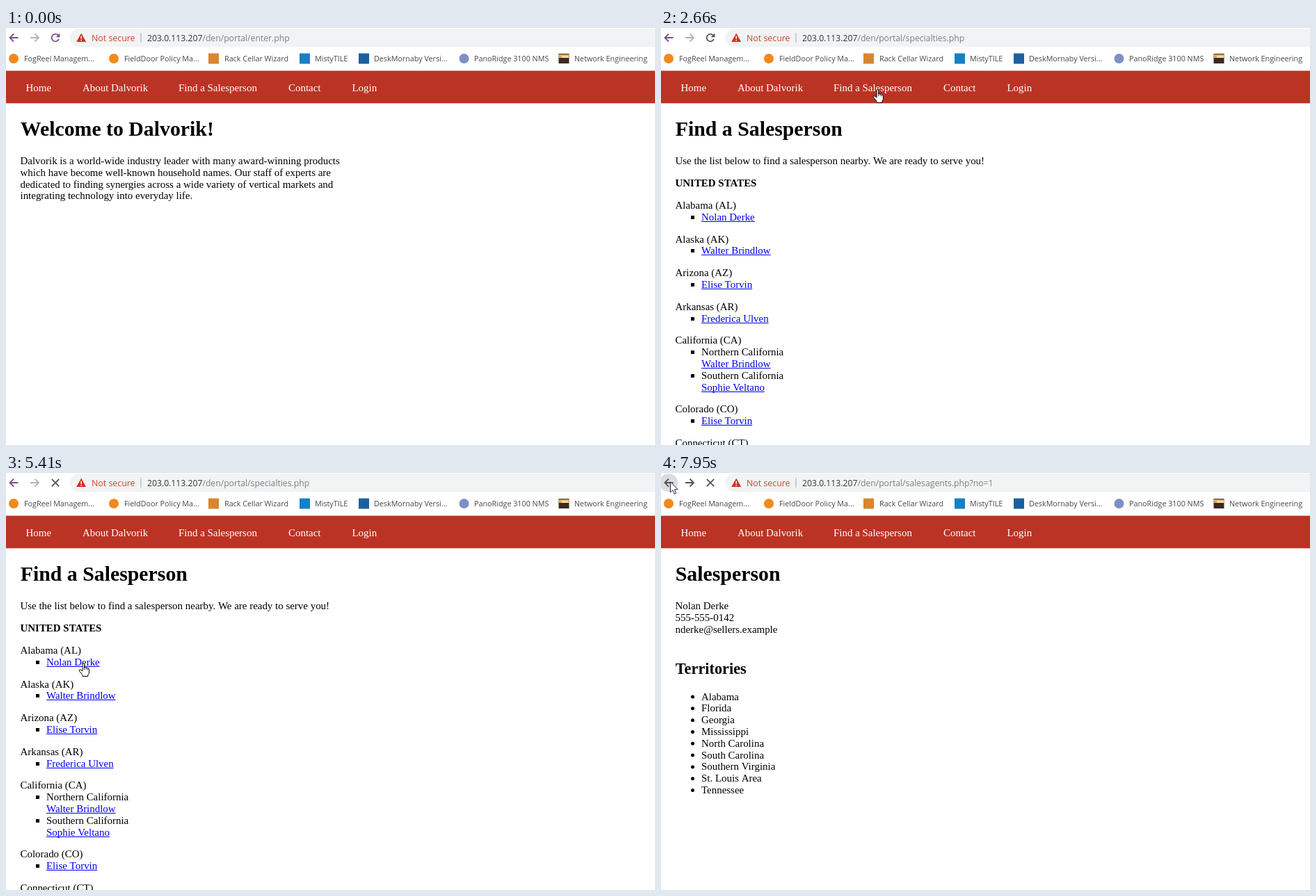
Recreate the animation shown at these times as an HTML page with a canvas. Size 933 by 600 pixels, loop 8 s.

```html
<!DOCTYPE html>
<html lang="en">
<head>
<meta charset="utf-8">
<title>Find a Salesperson</title>
<style>
  html, body { margin: 0; width: 100%; height: 100%; overflow: hidden; background: #fff; }
  canvas { display: block; }
</style>
</head>
<body>
<canvas id="stage" width="933" height="600"></canvas>
<script>
const ctx = document.getElementById('stage').getContext('2d');
const LOOP = 8000;
const SERIF = '"Liberation Serif", "Times New Roman", serif';
const SANS = '"Open Sans", "Noto Sans", sans-serif';
const BODY = `14.95px ${SERIF}`;
const LINE = 16.82;
const GAP = 14.95;
const LINK = '#0000ee';
const DARK = '#50555a';
const PURPLE = '#75548a';

const BOOKMARKS = [
  [26, 'FogReel Managem...', 'circle', 11, '#f08a1d'],
  [170, 'FieldDoor Policy Ma...', 'circle', 155, '#f08a1d'],
  [314, 'Rack Cellar Wizard', 'square', 298.5, '#d9862e'],
  [444, 'MistyTILE', 'square', 429.5, '#1680c4'],
  [529, 'DeskMornaby Versi...', 'square', 514.5, '#1c5f9e'],
  [673, 'PanoRidge 3100 NMS', 'circle', 658.5, '#7f8fc4'],
  [817, 'Network Engineering', 'photo', 802, '']
];
const NAV = [[28.5, 'Home'], [110, 'About Dalvorik'], [248, 'Find a Salesperson'],
             [406, 'Contact'], [497.5, 'Login']];
const INTRO = [
  'Dalvorik is a world-wide industry leader with many award-winning products',
  'which have become well-known household names. Our staff of experts are',
  'dedicated to finding synergies across a wide variety of vertical markets and',
  'integrating technology into everyday life.'
];
// "-" starts a bulleted line, "@" marks a link
const STATES = [
  ['Alabama (AL)', '-@Nolan Derke'],
  ['Alaska (AK)', '-@Walter Brindlow'],
  ['Arizona (AZ)', '-@Elise Torvin'],
  ['Arkansas (AR)', '-@Frederica Ulven'],
  ['California (CA)', '-Northern California', '@Walter Brindlow', '-Southern California', '@Sophie Veltano'],
  ['Colorado (CO)', '-@Elise Torvin'],
  ['Connecticut (CT)']
];
const TERRITORIES = ['Alabama', 'Florida', 'Georgia', 'Mississippi', 'North Carolina',
  'South Carolina', 'Southern Virginia', 'St. Louis Area', 'Tennessee'];

const between = (t, a, b) => t >= a && t < b;
const mix = (a, b, k) => a + (b - a) * k;
const smooth = k => k * k * (3 - 2 * k);

function text(s, x, y, font, color = '#000') {
  ctx.font = font;
  ctx.fillStyle = color;
  ctx.fillText(s, x, y);
  return ctx.measureText(s).width;
}

function rect(x, y, w, h, color) {
  ctx.fillStyle = color;
  ctx.fillRect(x, y, w, h);
}

function disc(x, y, r, color) {
  ctx.fillStyle = color;
  ctx.beginPath();
  ctx.arc(x, y, r, 0, Math.PI * 2);
  ctx.fill();
}

function poly(points, fill) {
  ctx.beginPath();
  points.forEach(([x, y]) => ctx.lineTo(x, y));
  ctx.closePath();
  ctx.fillStyle = fill;
  ctx.fill();
}

function stroke(color, width, ...lines) {
  ctx.strokeStyle = color;
  ctx.lineWidth = width;
  ctx.beginPath();
  for (const [first, ...rest] of lines) {
    ctx.moveTo(...first);
    rest.forEach(p => ctx.lineTo(...p));
  }
  ctx.stroke();
}

function arrowIcon(x, dir, color) {
  stroke(color, 1.8,
    [[x - 6 * dir, 14], [x + 5.5 * dir, 14]],
    [[x + 0.5 * dir, 8.5], [x + 6 * dir, 14], [x + 0.5 * dir, 19.5]]);
}

function reloadIcon(color) {
  ctx.strokeStyle = color;
  ctx.lineWidth = 1.8;
  ctx.beginPath();
  ctx.arc(71, 14, 5.3, 0.35, Math.PI * 1.78);
  ctx.stroke();
  poly([[77.4, 7.6], [77.4, 13.3], [71.7, 13.3]], color);
}

function photoIcon(x, y) {
  rect(x - 7.5, y - 7, 15, 14, '#3a2a22');
  rect(x - 7.5, y - 6, 15, 5, '#e0a95c');
  rect(x - 3, y - 4, 10, 3, '#f4dc9c');
}

function toolbar(t, page) {
  const loading = between(t, 2280, 2660) || between(t, 5330, 5510) || t >= 7870;
  const hover = Math.min(1, Math.max(0, (t - 7390) / 240));
  if (hover) disc(11, 14, 13, `rgba(218,220,224,${hover})`);
  arrowIcon(11.5, -1, t >= 7310 ? DARK : PURPLE);
  arrowIcon(41, 1, t >= 7870 ? DARK : '#b4b4b8');
  if (loading) {
    stroke(DARK, 1.8, [[65.8, 8.8], [76.2, 19.2]], [[76.2, 8.8], [65.8, 19.2]]);
  } else {
    reloadIcon(t < 2280 ? PURPLE : DARK);
  }

  ctx.fillStyle = '#f1f3f4';
  ctx.beginPath();
  ctx.roundRect(92, 1, 870, 26, 13);
  ctx.fill();
  poly([[108.2, 7.5], [115.2, 20], [101.2, 20]], '#d5301f');
  rect(107.5, 11.5, 1.5, 4.3, '#fff');
  rect(107.5, 17, 1.5, 1.5, '#fff');
  text('Not secure', 123, 18.5, `12.4px ${SANS}`, '#cb452f');
  rect(193.5, 7, 1, 14, '#a5a8ac');
  const urlFont = `12.2px ${SANS}`;
  const w = text('203.0.113.207', 203, 18.5, urlFont, '#33363a');
  text('/den/portal/' + page, 203 + w, 18.5, urlFont, '#7b7f84');

  for (const [x, label, kind, ix, color] of BOOKMARKS) {
    if (kind === 'circle') disc(ix, 44, 7, color);
    else if (kind === 'square') rect(ix - 7.5, 36.5, 15, 15, color);
    else photoIcon(ix, 44);
    text(label, x, 48, `10.75px ${SANS}`, '#45484c');
  }
}

function navBar() {
  rect(0, 61.5, 933, 46.8, '#bb3324');
  NAV.forEach(([x, label]) => text(label, x, 91, BODY, '#fff'));
}

const heading = s => text(s, 20.8, 155, `bold 29.8px ${SERIF}`);

function homePage() {
  heading('Welcome to Dalvorik!');
  INTRO.forEach((s, i) => text(s, 20.5, 196 + i * LINE, BODY));
}

function listPage() {
  heading('Find a Salesperson');
  text('Use the list below to find a salesperson nearby. We are ready to serve you!', 20.5, 196, BODY);
  text('UNITED STATES', 20.5, 228, 'bold ' + BODY);
  let y = 260;
  for (const [state, ...rows] of STATES) {
    text(state, 20.5, y, BODY);
    for (const row of rows) {
      y += LINE;
      const link = row.includes('@');
      if (row[0] === '-') rect(43, Math.round(y) - 7, 5, 5, '#000');
      const w = text(row.replace(/^-?@?/, ''), 58, y, BODY, link ? LINK : '#000');
      if (link) rect(58, Math.round(y) + 1, w, 1, LINK);
    }
    y += LINE + GAP;
  }
}

function personPage() {
  heading('Salesperson');
  ['Nolan Derke', '555-555-0142', 'nderke@sellers.example']
    .forEach((s, i) => text(s, 20.5, 196 + i * LINE, BODY));
  text('Territories', 20.8, 289, `bold 22.3px ${SERIF}`);
  TERRITORIES.forEach((s, i) => {
    const y = 326.5 + i * LINE;
    disc(45.5, y - 4.5, 2.5, '#000');
    text(s, 58, y, BODY);
  });
}

// Pointer moves: start, end, steps, from, to, x easing, y easing
const out = p => k => 1 - (1 - k) ** p;
const linear = k => k;
const MOVES = [
  [610, 1400, 10, [839, 563], [313, 93], out(3.48), out(2.29)],
  [1400, 1560, 2, [313, 93], [308, 88], linear, linear],
  [3120, 4000, 11, [308, 88], [129, 274], smooth, smooth],
  [4000, 4240, 3, [129, 274], [108, 273], out(2), out(2)],
  [6350, 6670, 4, [108, 273], [132, 161], out(2), linear],
  [6670, 7230, 7, [132, 161], [3, 17], smooth, out(1.6)],
  [7230, 7310, 1, [3, 17], [6, 12], linear, linear],
  [7390, 7630, 3, [6, 12], [13, 12], linear, linear]
];

// The pointer is sampled in steps; the slack absorbs their 10 ms rounding
function pointerAt(t) {
  let pos = null;
  for (const [a, b, n, from, to, ex, ey] of MOVES) {
    if (t < a) break;
    const k = Math.min(1, Math.floor((t - a) / (b - a) * n + 0.12) / n);
    pos = [mix(from[0], to[0], ex(k)), mix(from[1], to[1], ey(k))].map(Math.round);
  }
  return pos;
}

function overLink(t, x, y) {
  if (between(t, 5510, 6430)) return true;
  if (y > 70 && y < 100) return x > 248 && x < 362;
  return between(t, 2660, 5510) && x > 58 && x < 136 && y > 263 && y < 280;
}

function shape(x, y, d, fill, line) {
  const path = new Path2D(d);
  ctx.save();
  ctx.translate(x, y);
  ctx.lineJoin = 'round';
  ctx.lineWidth = 1;
  ctx.fillStyle = fill;
  ctx.fill(path);
  ctx.strokeStyle = line;
  ctx.stroke(path);
  ctx.restore();
}

function drawPointer(t) {
  const pos = pointerAt(t);
  if (!pos) return;
  const [x, y] = pos;
  if (between(t, 1790, 1950) || between(t, 5020, 5190) || between(t, 7790, 7870)) {
    for (const [r, color] of [[10, '#000'], [9, '#fff']]) {
      ctx.strokeStyle = color;
      ctx.lineWidth = 1;
      ctx.beginPath();
      ctx.arc(x + 0.5, y + 0.5, r, 0, Math.PI * 2);
      ctx.stroke();
    }
  }
  if (overLink(t, x, y)) {
    shape(x, y, 'M2 12V2Q2 .5 3.3 .5T4.6 2V7Q5.8 5.8 7.2 7.3Q8.6 6.4 9.6 7.9Q11.5 7.4 11.5 9.5V14Q11.5 16 9.8 17.3V19.5H2V17.5L-2.5 12Q-3.5 10 -1.8 9.8Q-.6 9.8 2 12Z', '#fff', '#000');
    stroke('#000', 0.8, [[x + 4.6, y + 7], [x + 4.6, y + 10]],
      [[x + 7.2, y + 7.3], [x + 7.2, y + 10]], [[x + 9.5, y + 8], [x + 9.5, y + 10.5]]);
  } else {
    shape(x, y, 'M.5 .8V15.8L3.9 12.6L6.4 18.2L8.8 17.2L6.4 11.7H11.2Z', '#fff', '#20203a');
  }
}

function tooltip() {
  rect(13, 33, 192, 18, '#767676');
  rect(14, 34, 190, 16, '#fff');
  text('Click to go back, hold to see history', 17, 46, `10.2px ${SANS}`, '#575757');
}

function draw(t) {
  rect(0, 0, 933, 600, '#fff');
  const page = t < 2430 ? 'enter.php' : t < 5510 ? 'specialties.php' : 'salesagents.php?no=1';
  toolbar(t, page);
  navBar();
  if (t < 2660) homePage();
  else if (t < 5510) listPage();
  else personPage();
  if (between(t, 7710, 7870)) tooltip();
  drawPointer(t);
}

function tick() {
  draw(performance.now() % LOOP);
  requestAnimationFrame(tick);
}
tick();
</script>
</body>
</html>
```
